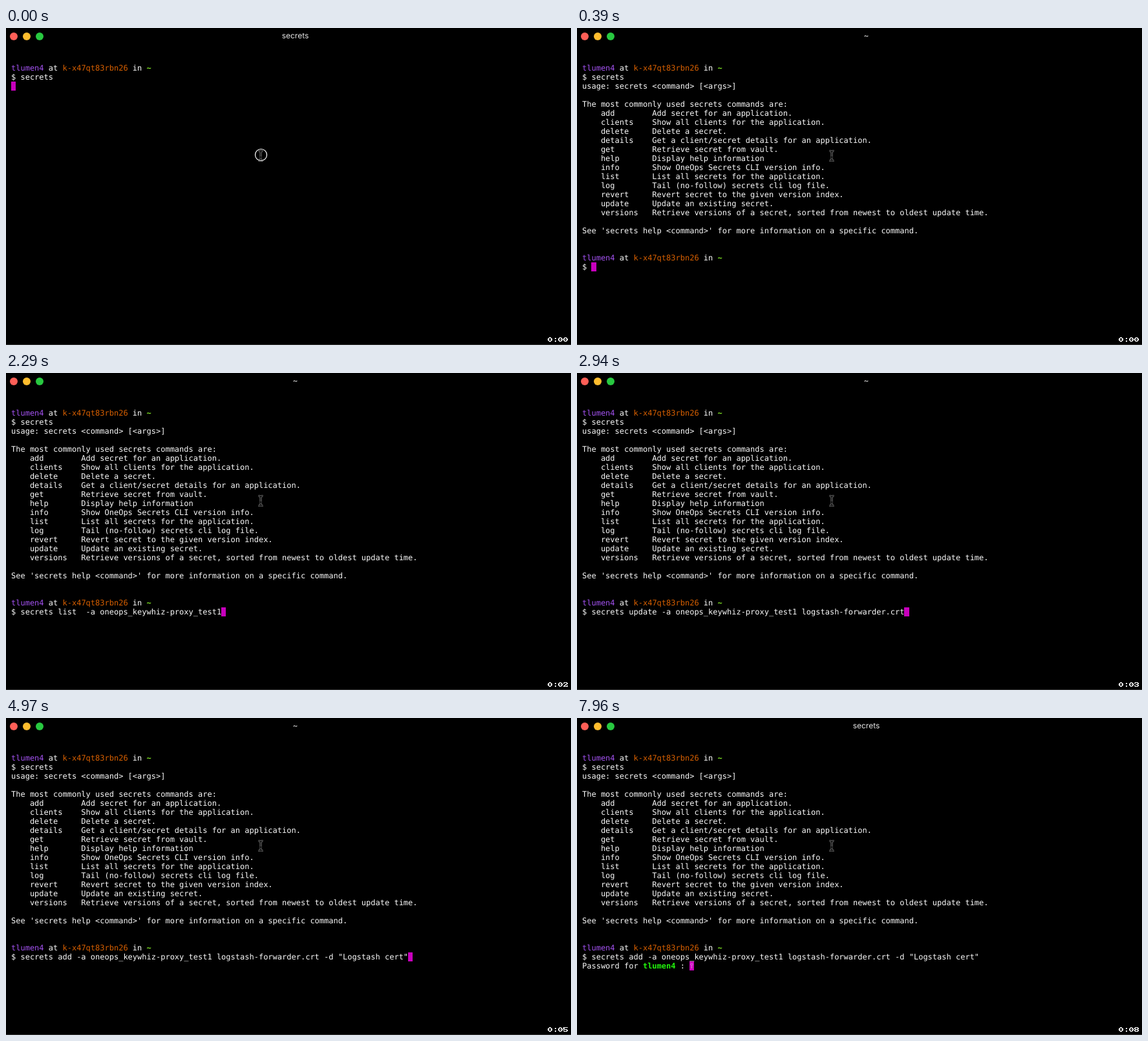
Animation of 874 by 491 pixels, one loop 8000 ms. Source, as an HTML page with a canvas:

```html
<!DOCTYPE html>
<html lang="en">
<head>
<meta charset="utf-8">
<title>Terminal</title>
<style>
  html, body { margin: 0; width: 100%; height: 100%; overflow: hidden; background: #000; }
  canvas, pre, #title { position: absolute; margin: 0; }
  canvas { left: 0; top: 0; display: block; }
  pre {
    left: 8px; top: 55px;
    font: 12px/14px "DejaVu Sans Mono", monospace;
    text-rendering: geometricPrecision;
    font-variant-ligatures: none;
    color: #fafafa;
  }
  #title {
    left: 21px; right: 0; top: 4px; text-align: center;
    font: 12px/16px Inter, sans-serif;
    text-rendering: geometricPrecision;
    color: #e6e6e6;
  }
  .user { color: #a452f2; }
  .host { color: #d75f00; }
  .dir { color: #7fe324; font-weight: bold; }
  .login { color: #22f50c; font-weight: bold; }
</style>
</head>
<body>
<canvas width="874" height="491"></canvas>
<div id="title"></div>
<pre></pre>
<script>
const LOOP = 8000, CELL = 7.224, LINE = 14, LEFT = 8, TOP = 55;
const USER = 'tlumen4', HOST = 'k-x47qt83rbn26';
const APP = '-a oneops_keywhiz-proxy_test1', CERT = 'logstash-forwarder.crt';

const ctx = document.querySelector('canvas').getContext('2d');
const screen = document.querySelector('pre');
const title = document.getElementById('title');

const span = (cls, text) => `<span class="${cls}">${text}</span>`;
const escape = s => s.replace(/</g, '&lt;').replace(/>/g, '&gt;');
const prompt = `${span('user', USER)} at ${span('host', HOST)} in ${span('dir', '~')}`;

const commands = [
  ['add', 'Add secret for an application.'],
  ['clients', 'Show all clients for the application.'],
  ['delete', 'Delete a secret.'],
  ['details', 'Get a client/secret details for an application.'],
  ['get', 'Retrieve secret from vault.'],
  ['help', 'Display help information'],
  ['info', 'Show OneOps Secrets CLI version info.'],
  ['list', 'List all secrets for the application.'],
  ['log', 'Tail (no-follow) secrets cli log file.'],
  ['revert', 'Revert secret to the given version index.'],
  ['update', 'Update an existing secret.'],
  ['versions', 'Retrieve versions of a secret, sorted from newest to oldest update time.']
];

const help = escape([
  'usage: secrets <command> [<args>]',
  '',
  'The most commonly used secrets commands are:',
  ...commands.map(([name, text]) => '    ' + name.padEnd(11) + text),
  '',
  "See 'secrets help <command>' for more information on a specific command.",
  '', ''
].join('\n'));

// Shell history recalled at the second prompt: [start ms, command]
const history = [
  [390, ''],
  [1030, 'secrets'],
  [1270, 'clear'],
  [1630, `secrets revert ${APP} ${CERT} --index 1024`],
  [2290, `secrets list  ${APP}`],
  [2530, `secrets update ${APP} ${CERT}`],
  [3540, `secrets add ${APP} ${CERT} -d "Logstash cert"`]
];
const RUN = 6590, ASK = 7480;
const ticks = [980, 1990, 2940, 3960, 4970, 5930, 6940, 7960];

function stateAt(t) {
  const seconds = ticks.filter(at => t >= at).length;
  const first = `${prompt}\n$ secrets\n`;
  if (t < history[0][0]) {
    return { text: first, title: 'secrets', col: 0, row: 2, seconds, click: t < 60 };
  }
  const line = '$ ' + history.filter(([at]) => t >= at).pop()[1];
  const state = {
    text: `${first}${help}\n${prompt}\n${line}`,
    title: '~', col: line.length, row: 22, seconds
  };
  if (t >= RUN) {
    state.title = 'secrets';
    state.row = 23;
    state.col = 0;
  }
  if (t >= ASK) {
    state.text += `\nPassword for ${span('login', USER)} : `;
    state.col = `Password for ${USER} : `.length;
    state.hidden = true;
  }
  return state;
}

function disc(x, y, r, color) {
  ctx.fillStyle = color;
  ctx.beginPath();
  ctx.arc(x, y, r, 0, Math.PI * 2);
  ctx.fill();
}

function drawPointer(click) {
  const beam = new Path2D(
    'M390.5 190.5 Q394 190 394 193 Q394 190 397.5 190.5' +
    'M390.5 205.5 Q394 206 394 203 Q394 206 397.5 205.5' +
    'M394 192 V204 M392.5 200 H395.5');
  for (const [width, color] of [[3, '#8a8a8a'], [1.3, '#000']]) {
    ctx.lineWidth = width;
    ctx.strokeStyle = color;
    ctx.stroke(beam);
  }
  if (!click) return;
  ctx.lineWidth = 1.2;
  ctx.strokeStyle = '#fff';
  ctx.beginPath();
  ctx.arc(394.5, 196.5, 9, 0, Math.PI * 2);
  ctx.stroke();
}

// Pen strokes on an 8 by 8 grid; each point is column, row
const glyphs = {
  0: ['20 02 04 26 36 54 52 30 20', '33'],
  1: ['21 30 36', '16 56'],
  2: ['01 10 40 51 52 43 33 24 06 56 55'],
  3: ['01 10 40 51 52 43 23 43 54 55 46 16 05'],
  4: ['30 03 04 54', '40 46', '36 56'],
  5: ['50 00 03 43 54 55 46 16 05'],
  6: ['30 20 02 05 16 46 55 54 43 03'],
  7: ['01 00 50 51 24 26'],
  8: ['10 40 51 52 43 13 02 01 10', '13 04 05 16 46 55 54 43'],
  ':': ['31 32', '35 36']
};

// The pen is two pixels wide; a lone point is a one-pixel dot
function drawStroke(stroke, left, top) {
  const points = stroke.split(' ').map(p => [+p[0], +p[1]]);
  if (points.length === 1) ctx.fillRect(left + points[0][0], top + points[0][1], 1, 1);
  for (let i = 1; i < points.length; i++) {
    const [x, y] = points[i - 1];
    const dx = points[i][0] - x, dy = points[i][1] - y;
    const steps = Math.max(Math.abs(dx), Math.abs(dy));
    for (let k = 0; k <= steps; k++) {
      ctx.fillRect(left + x + dx * k / steps, top + y + dy * k / steps, 2, 1);
    }
  }
}

function drawClock(seconds) {
  ctx.fillStyle = '#fff';
  [...`0:0${seconds}`].forEach((ch, i) => {
    glyphs[ch].forEach(stroke => drawStroke(stroke, 838 + 8 * i, 479));
  });
}

function drawCursor({ col, row, hidden }) {
  const edge = c => Math.round(LEFT + CELL * c);
  const x = edge(col), y = TOP + LINE * row;
  ctx.fillStyle = '#c800bd';
  ctx.fillRect(x, y, edge(col + 1) - x, LINE);
  if (!hidden) return;
  ctx.strokeStyle = '#e77be0';
  ctx.lineWidth = 1;
  ctx.beginPath();
  ctx.arc(x + 3.5, y + 4.5, 1.5, 0, Math.PI * 2);
  ctx.moveTo(x + 3.5, y + 6);
  ctx.lineTo(x + 3.5, y + 11);
  ctx.stroke();
}

function render(state) {
  ctx.fillStyle = '#000';
  ctx.fillRect(0, 0, 874, 491);
  ctx.fillStyle = '#303030';
  ctx.fillRect(0, 490, 874, 1);
  ['#ff5f57', '#ffbd2e', '#28c940'].forEach((color, i) => disc(12 + 20 * i, 13, 6, color));
  drawCursor(state);
  drawPointer(state.click);
  drawClock(state.seconds);
  title.textContent = state.title;
  screen.innerHTML = state.text;
}

let shown = '';
const start = performance.now();

function tick() {
  const state = stateAt((performance.now() - start) % LOOP);
  const key = JSON.stringify(state);
  if (key !== shown) {
    shown = key;
    render(state);
  }
  requestAnimationFrame(tick);
}
tick();
</script>
</body>
</html>
```
